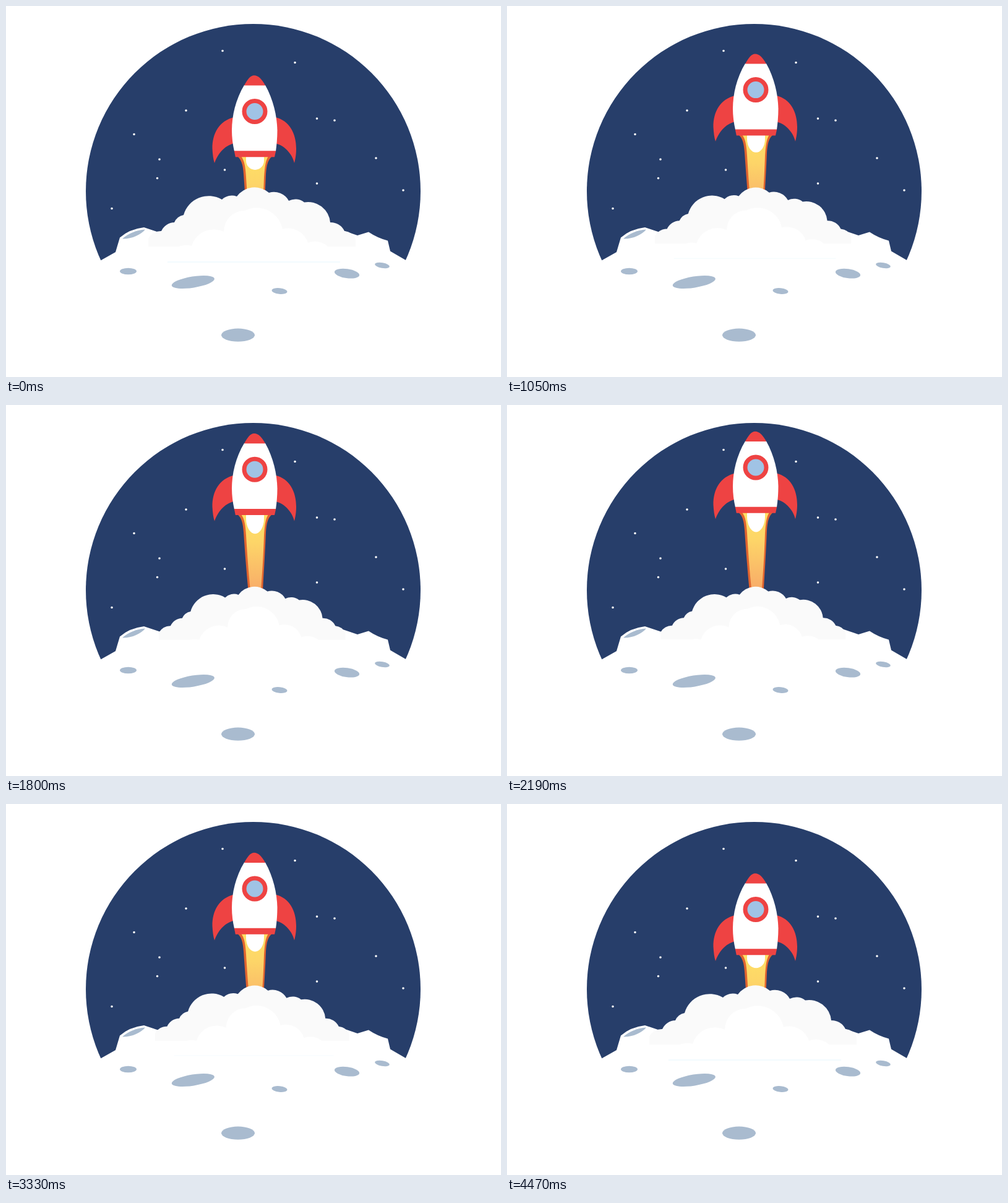
Write an HTML page that moves like this. It is 800 by 600 pixels and loops after 4500 ms.

```html
<!DOCTYPE html>
<html lang="en">
<head>
<meta charset="utf-8">
<title>Rocket launch</title>
<style>
  html, body { margin: 0; width: 100%; height: 100%; overflow: hidden; background: #fff; }
  svg { display: block; width: 100vw; height: 100vh; }
</style>
</head>
<body>
<svg viewBox="0 0 800 600">
  <defs>
    <linearGradient id="fire" gradientUnits="userSpaceOnUse" x1="0" y1="244" x2="0" y2="370">
      <stop offset="0" stop-color="#fee065"/>
      <stop offset=".35" stop-color="#fdd568"/>
      <stop offset="1" stop-color="#f8aa68"/>
    </linearGradient>
  </defs>

  <circle cx="399.5" cy="299.5" r="270.5" fill="#273e6a"/>
  <path id="stars" stroke="#fff" stroke-width="3.6" stroke-linecap="round" d="M350 72.500h0M467 91.500h0M291 169h0M207 207.500h0M248 248h0M244.500 278.500h0M353.500 265h0M171 327.500h0M502.500 182h0M531 185h0M598 246h0M642 298h0M502.500 287h0"/>

  <g id="rocket">
    <path fill="#e0642f" d="M374 243C381 249 383 258 384 272C386 300 388 330 391.500 366L394 390H413L415 366C417 330 419 300 420 272C421 258 423 249 430 243Z"/>
    <path fill="url(#fire)" d="M380 243C386 251 387 262 388 277C390 310 392 338 395 366L397 390H409L412 366C414 338 416 310 417 277C418 262 419 251 424 243Z"/>
    <path id="glow" fill="#fff"/>
    <g fill="#ee4343">
      <path d="M369 180C345 185 333 206 333.500 231C334 240 335 248 337 254C342 240 352 226 369 222Z"/>
      <path d="M435 180C458 185 469 206 469 231C469 241 467.500 248 466 254C463 241 452 226 435 222Z"/>
    </g>
    <path fill="#fff" d="M385 128C371 151 365 178 365 201C365 213 366.500 224 369 235H436C437.500 224 438.500 213 438.500 201C438 178 432 151 419 128Z"/>
    <g fill="#ee4343">
      <path d="M385 128.500C390 119 395 112.300 401 112.300C408 112.300 414 119 419 128.500Z"/>
      <path d="M368.800 234.300H436.200L434 244.300H370.800Z"/>
    </g>
    <circle cx="402" cy="170.500" r="17" fill="#a0c3e5" stroke="#ee4343" stroke-width="7"/>
  </g>

  <path fill="#fff" d="M100 442L153 411.500L177 398L184 374.500Q199 361 223 358L250 367L400 372L528 357.500L568 371L586 365.500Q600 375 617 379.500L621 396.500L646 411L700 442V600H100Z"/>

  <path id="back" fill="#fafafa"/>
  <g id="front" fill="#fff">
    <path id="steam"/>
    <path id="rim" stroke="#e6f6fe" d="M261 414H540"/>
  </g>

  <g fill="#a9bbcf">
    <path d="M188 376.500C197 368.500 211 362 225 361.500C218 370 203 377 188 376.500Z"/>
    <ellipse cx="197.500" cy="429" rx="13.500" ry="5.300"/>
    <ellipse rx="35" ry="9" transform="translate(302.300 446.500) rotate(-9)"/>
    <ellipse rx="12.500" ry="4.800" transform="translate(442 461) rotate(6)"/>
    <ellipse rx="20.300" ry="7.400" transform="translate(551 432.700) rotate(8)"/>
    <ellipse rx="12" ry="4.400" transform="translate(608 419.500) rotate(10)"/>
    <ellipse cx="375" cy="532.200" rx="27" ry="10.600"/>
  </g>
</svg>
<script>
const LOOP = 4500, STEP = 30, LIFT = 69.8;
const $ = id => document.getElementById(id);
const set = (id, name, value) => $(id).setAttribute(name, value);

// A cloud is a chain of round puffs between notches; wider puffs get a larger radius.
function cloud(notches, base) {
  const pts = notches.split(" ").map(p => p.split(",").map(Number));
  const arcs = pts.slice(1).map(([x, y], i) => {
    const r = 12 + 0.45 * Math.hypot(x - pts[i][0], y - pts[i][1]);
    return `A${r} ${r} 0 0 1 ${x} ${y}`;
  });
  return `M${pts[0]}${arcs.join("")}V${base}H${pts[0][0]}Z`;
}

set("back", "d", cloud("230,376 251,364 272,350 287,338 349,313 373,308 425,302 457,315 482,317.5 524,350 547,364 565,377", 389));
set("steam", "d", cloud("260,410 300,388 352,365 386,331 447,361 488,383 527,398 540,410", 414));

const ease = u => (1 - Math.cos(Math.PI * Math.min(1, Math.max(0, u)))) / 2;

// Rises until `top`, rests, then falls from `leave` to the end of the loop.
const swell = (t, top, leave) => ease(t / top) - ease((t - leave) / (LOOP - leave));

const scaleAt = (id, x, y, s) =>
  set(id, "transform", `translate(${x} ${y}) scale(${s}) translate(${-x} ${-y})`);

function draw(t) {
  set("rocket", "transform", `translate(0 ${-LIFT * swell(t, 2100, 2100)})`);

  const len = 15 + 10 * Math.sin(Math.PI * t / LOOP);
  set("glow", "d", `M388 243V250A14.500 ${len} 0 0 0 417 250V243Z`);

  const shrink = swell(t, 2150, 2400);
  scaleAt("back", 400, 297, 1 - 0.107 * shrink);
  scaleAt("front", 402, 322, 1 - 0.13 * shrink);
  set("rim", "opacity", 1 - shrink);
}

function frame(now) {
  draw(Math.floor(now % LOOP / STEP) * STEP);
  requestAnimationFrame(frame);
}
draw(0);
requestAnimationFrame(frame);
</script>
</body>
</html>
```
